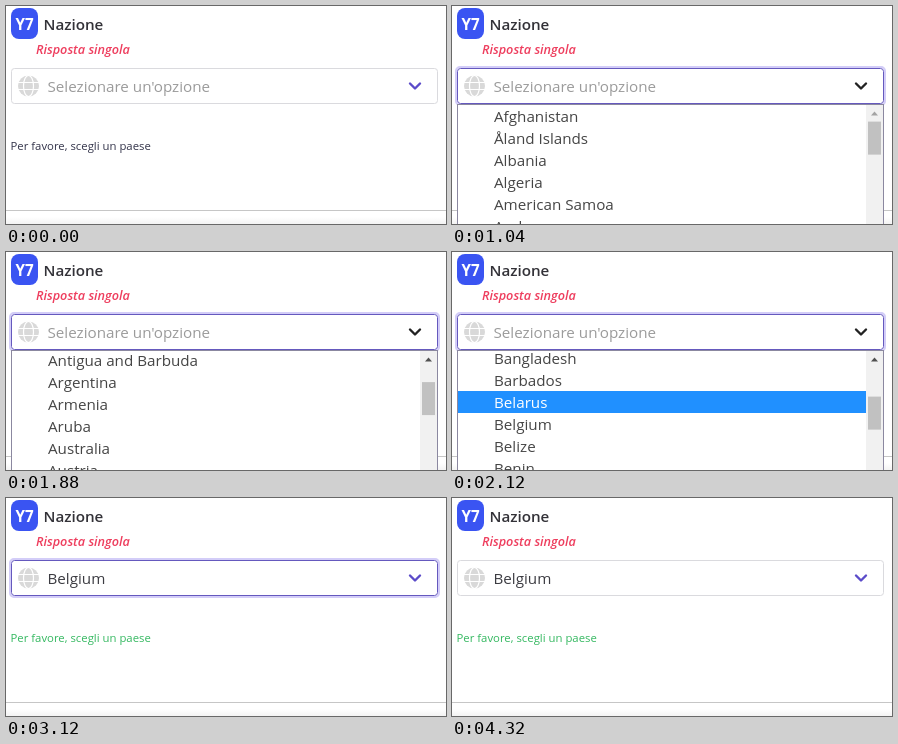
An HTML page for the animation above (4.36 s loop, 440 by 218 pixels).

```html
<!DOCTYPE html>
<html lang="it">
<head>
<meta charset="utf-8">
<title>Nazione</title>
<style>
  html, body { margin: 0; width: 100%; height: 100%; overflow: hidden; background: #fff; }
  svg { display: block; width: 440px; height: 218px; font: 15.2px "Open Sans", "Noto Sans", sans-serif; fill: #454545; }
  .bold { font-weight: 600; }
  .line { fill: none; }
</style>
</head>
<body>
<svg viewBox="0 0 440 218">
  <defs>
    <linearGradient id="shade" x2="0" y2="1">
      <stop stop-color="#fff"/>
      <stop offset="1" stop-color="#f3f3f3"/>
    </linearGradient>
    <clipPath id="listArea"><path d="M6 99H432V218H6z"/></clipPath>
  </defs>

  <path d="M0 211H440V218H0z" fill="url(#shade)"/>
  <path d="M0 204.5H440" stroke="#c6c6c6"/>

  <rect x="5" y="2" width="27" height="31" rx="8" fill="#3a54f2"/>
  <text x="18.5" y="24" text-anchor="middle" font-weight="700" fill="#fff">Y7</text>
  <text class="bold" x="37.5" y="24" fill="#333238">Nazione</text>
  <text class="bold" x="30" y="48" font-size="12.7" font-style="italic" fill="#ee3e5e">Risposta singola</text>

  <rect id="ring" class="line" x="4" y="61" width="429" height="38" rx="4" stroke="#d3cdf8" stroke-width="2"/>
  <rect id="border" x="5.5" y="62.5" width="426" height="35" rx="3" style="fill:#fff"/>
  <circle cx="22.5" cy="80" r="10.5" fill="#d9d9d9"/>
  <g class="line" stroke="#fff" stroke-width="1.2">
    <ellipse cx="22.5" cy="80" rx="5" ry="10.5"/>
    <path d="M12 76.5H33M12 83.5H33"/>
  </g>
  <text id="value" x="41.5" y="86"></text>
  <path id="chevron" class="line" d="M404 77.5L409 82.5L414 77.5" stroke-width="2.4" stroke-linecap="round" stroke-linejoin="round"/>
  <text id="hint" x="4.5" y="144" font-size="11.35">Per favore, scegli un paese</text>

  <g id="popup">
    <rect x="5.5" y="98.5" width="426" height="130" fill="#fff" stroke="#8b88a0"/>
    <g clip-path="url(#listArea)">
      <g id="list">
        <rect id="highlight" x="6" width="408" height="22" fill="#2090ff"/>
      </g>
    </g>
    <path d="M414 99H431V218H414z" fill="#f1f1f1"/>
    <path id="arrow" d="M419 109.5L422.5 105.5L426 109.5z"/>
    <rect id="thumb" x="416" width="13" height="33" fill="#c1c1c1"/>
  </g>
</svg>
<script>
const LOOP = 4360, STEP = 40, ROW = 22, LIST_TOP = 99;
const $ = id => document.getElementById(id);
const set = (id, attrs) => Object.entries(attrs).forEach(([k, v]) => $(id).setAttribute(k, v));

const countries = ["Afghanistan", "Åland Islands", "Albania", "Algeria", "American Samoa", "Andorra",
  "Angola", "Anguilla", "Antarctica", "Antigua and Barbuda", "Argentina", "Armenia", "Aruba",
  "Australia", "Austria", "Azerbaijan", "Bahamas", "Bahrain", "Bangladesh", "Barbados", "Belarus",
  "Belgium", "Belize", "Benin", "Bermuda"];

const labels = countries.map((name, i) => {
  const label = document.createElementNS("http://www.w3.org/2000/svg", "text");
  label.textContent = name;
  label.setAttribute("x", 42);
  label.setAttribute("y", LIST_TOP + i * ROW + 17);
  $("list").append(label);
  return label;
});

// [start time, value] pairs; the last one reached applies
const scrollSteps = [[0, 0], [1880, 200], [2040, 400]];
const hoverSteps = [[0, ""], [1560, "Afghanistan"], [1600, "Åland Islands"], [1680, "Albania"],
  [1880, ""], [1920, "Armenia"], [2040, ""], [2080, "Belarus"], [2320, "Belgium"]];
const HOVER_START = 280, OPEN = 800, CLOSE = 3040, BLUR = 4280;

const at = (steps, t) => steps.filter(([start]) => start <= t).pop()[1];
const ramp = (t, from, to) => Math.min(1, Math.max(0, (t - from) / (to - from)));
const mix = (a, b, k) => `rgb(${a.map((v, i) => Math.round(v + (b[i] - v) * k))})`;

const IDLE = [218, 218, 222], HOVER = [184, 184, 190], PURPLE = [101, 89, 190];

function render(t) {
  const focus = ramp(t, OPEN - 80, OPEN) - ramp(t, BLUR - 40, BLUR + 40);
  const chosen = t >= CLOSE;
  const open = t >= OPEN && !chosen;
  const hovered = t >= HOVER_START && t < BLUR;

  set("ring", { opacity: focus });
  set("border", { stroke: mix(hovered ? HOVER : IDLE, PURPLE, focus) });
  set("chevron", { stroke: open ? "#222" : "#5b4bc9" });
  set("hint", { fill: chosen ? "#34b860" : "#33344a" });
  $("value").textContent = chosen ? "Belgium" : "Selezionare un'opzione";
  set("value", { fill: chosen ? "#3c3c42" : "#9b9b9b" });

  const scroll = at(scrollSteps, t), row = countries.indexOf(at(hoverSteps, t));
  set("popup", { visibility: open ? "visible" : "hidden" });
  set("list", { transform: `translate(0 ${-scroll})` });
  set("highlight", { y: LIST_TOP + row * ROW, opacity: row < 0 ? 0 : 1 });
  labels.forEach((label, i) => label.setAttribute("fill", i === row ? "#fff" : "#454545"));
  set("arrow", { fill: scroll ? "#505050" : "#a3a3a3" });
  set("thumb", { y: 115.6 + scroll * 0.0725 });
}

const begin = performance.now();
function frame() {
  const t = (performance.now() - begin) % LOOP;
  render(Math.floor(t / STEP) * STEP);
  requestAnimationFrame(frame);
}
frame();
</script>
</body>
</html>
```
